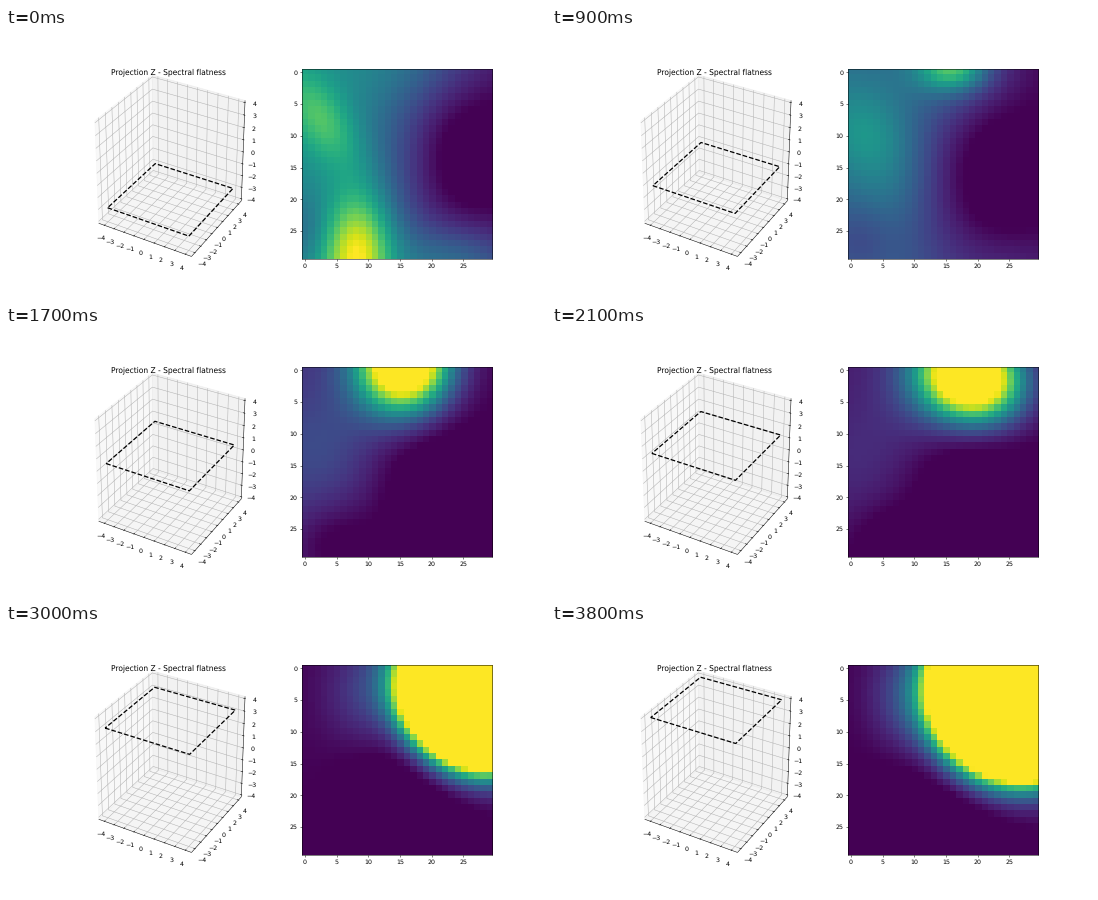
Write a matplotlib script that moves like this. It is 540 px wide and 270 px high and loops after 3900 ms.

```python
import numpy as np
import matplotlib.pyplot as plt
from matplotlib.animation import FuncAnimation
from matplotlib.collections import LineCollection
from matplotlib.patches import Polygon

W, H, DPI = 540, 270, 45
FRAMES, INTERVAL = 39, 100
LAYERS, FIRST = 40, 5            # slices through z, and the first one shown
LAST = LAYERS - 1 - FIRST        # step at which the plane reaches the top
LIM = np.array([8.8, 8.8, 8.0])  # span of each axis, centred on zero
EDGE = 0.5 * (1 + 1 / 24)        # panes reach a little past the limits
STEP = 1 / 12
TICKS = np.arange(-4, 5)

plt.rcParams["text.hinting"] = "none"
fig = plt.figure(figsize=(W / DPI, H / DPI), dpi=DPI, facecolor="white")

# --- left: a perspective cube, drawn in pixel coordinates ---
stage = fig.add_axes([0, 0, 1, 1])
stage.set(xlim=(0, W), ylim=(H, 0))
stage.axis("off")

AZIM, ELEV, DIST = np.radians(-60), np.radians(30), 10
EYE = np.array([np.cos(ELEV) * np.cos(AZIM), np.cos(ELEV) * np.sin(AZIM), np.sin(ELEV)])
RIGHT = np.array([-np.sin(AZIM), np.cos(AZIM), 0])
UP = np.cross(EYE, RIGHT)
PANEL_W, PANEL_H = 0.775 / 2.2 * W, 0.77 * H
LEFT, BOTTOM = 0.125 * W, 0.89 * H + 0.9


def project(points):
    """Cube coordinates (-0.5 to 0.5) to pixels."""
    p = np.asarray(points, float)
    depth = DIST - p @ EYE
    x = LEFT + (p @ RIGHT / depth + 0.095) / 0.185 * PANEL_W
    y = BOTTOM - (p @ UP / depth + 0.095) / 0.185 * PANEL_H
    return np.stack([x, y], axis=-1)


def at(axis, value, rest):
    """Point with one coordinate set to value and the other two from rest."""
    p = list(rest)
    p.insert(axis, value)
    return p


def draw_cube():
    e = EDGE
    square = [(-e, -e), (e, -e), (e, e), (-e, e)]
    for axis, side, grey in [(0, -e, 0.95), (1, e, 0.90), (2, -e, 0.925)]:
        corners = project([at(axis, side, c) for c in square])
        stage.add_patch(Polygon(corners, color=(grey,) * 3, alpha=0.5, lw=1))

    # Per axis: the edge it runs along, the direction of its ticks,
    # and the path of a grid line over the two panes it crosses.
    axes = [
        ((-e, -e), 1, [(-e, -e), (e, -e), (e, e)]),
        ((e, -e), 0, [(e, -e), (-e, -e), (-e, e)]),
        ((e, e), 0, [(-e, -e), (-e, e), (e, e)]),
    ]
    pad = 11.5 * 48 / (72 * (PANEL_W + PANEL_H) / DPI) * STEP
    grid, dark = [], []
    for axis, (rest, tick_dir, path) in enumerate(axes):
        dark.append(project([at(axis, -e, rest), at(axis, e, rest)]))
        for value in TICKS:
            pos = value / LIM[axis]
            grid.append(project([at(axis, pos, r) for r in path]))
            outer = np.array(at(axis, pos, rest))
            inner = outer.copy()
            side = np.sign(outer[tick_dir])
            outer[tick_dir] += 0.1 * STEP * side
            inner[tick_dir] -= 0.2 * STEP * side
            dark.append(project([outer, inner]))
            away = [r + pad * np.sign(r) for r in rest]
            x, y = project(at(axis, pos, away))
            stage.text(x, y, str(value).replace("-", "\u2212"),
                       size=10, ha="center", va="top")
    stage.add_collection(LineCollection(grid, colors="#b0b0b0", linewidths=0.8))
    stage.add_collection(LineCollection(dark, colors="black", linewidths=0.8))


draw_cube()
stage.text(LEFT + PANEL_W / 2, 46.2, "Projection Z - Spectral flatness",
           size=12, ha="center", va="baseline")
outline, = stage.plot([], [], "k--", lw=2, zorder=5)


def slice_outline(z):
    square = [(-4, -4), (4, -4), (4, 4), (-4, 4), (-4, -4)]
    return project([np.array([x, y, z]) / LIM for x, y in square])


# --- right: the feature map of the current slice ---
view = fig.add_subplot(1, 2, 2)
COL, ROW = np.meshgrid(np.arange(30), np.arange(30))


def blob(x, y, sx, sy, turn=0.0):
    dx, dy = COL - x, ROW - y
    u = dx * np.cos(turn) + dy * np.sin(turn)
    v = dy * np.cos(turn) - dx * np.sin(turn)
    return np.exp(-0.5 * ((u / sx) ** 2 + (v / sy) ** 2))


def fade(s, span):
    return np.exp(-(s / span) ** 2)


def bright_spot(s):
    """Slips in at the top, drifts right and swells."""
    keys = (0, 0.26, 0.5, 0.74, 0.88, 1)
    x = np.interp(s, keys, (17, 16, 15.7, 22.3, 26, 27))
    y = np.interp(s, keys, (-1, -0.5, -1, 3.5, 4.8, 3))
    level = np.interp(s, keys, (-4, -0.8, 0.26, 0.53, 2.24, 2.9))
    size = np.interp(s, keys, (3, 3, 4.9, 5, 5.4, 6.3))
    squash = 1.1 + 0.12 * np.cos(4 * np.pi * (s - 0.25))
    turn = np.pi / 4 * np.clip(4 * s - 2, 0, 1)
    return np.exp(level) * blob(x, y, size * squash, size / squash, turn)


def feature_map(s):
    """Field on the slice at s, from 0 (first) to 1 (top)."""
    slope = 0.5 * fade(s, 0.45) / (1 + np.exp((COL - 14.5 + 6 * s) / 4))
    ridge = 0.25 * fade(s, 0.5) * blob(2.5, 7.5 + 10 * s, 6, 3 + 6 * s, 1.0)
    peak = 0.58 * fade(s, 0.19) * blob(8 - 8 * s, 28.5 - 15 * s, 3.8, 6.5)
    foot = 0.32 * fade(s, 0.25) * blob(24, 31, 8, 5)
    glow = 0.17 * blob(20 - 12 * s, 7 * s - 2, 8 - 4 * s, 6)
    dip = 0.15 * blob(10 * s, 25 + 6 * s, 5, 4.5)
    basin = 0.13 * blob(26 - 12 * s, 13 + 11 * s, 5 + 3 * s, 7 + 3 * s)
    field = slope + ridge + peak + foot + glow - dip - basin + bright_spot(s)
    return np.clip(field, 0, 1)


image = view.imshow(feature_map(0), cmap="viridis", vmin=0, vmax=1,
                    interpolation="nearest")


def update(frame):
    step = min(frame, LAST)
    z = -4 + 8 * (step + FIRST) / (LAYERS - 1)
    outline.set_data(*slice_outline(z).T)
    image.set_data(feature_map(step / LAST))
    return outline, image


anim = FuncAnimation(fig, update, frames=FRAMES, interval=INTERVAL,
                     repeat=True, repeat_delay=0)
plt.show()
```
